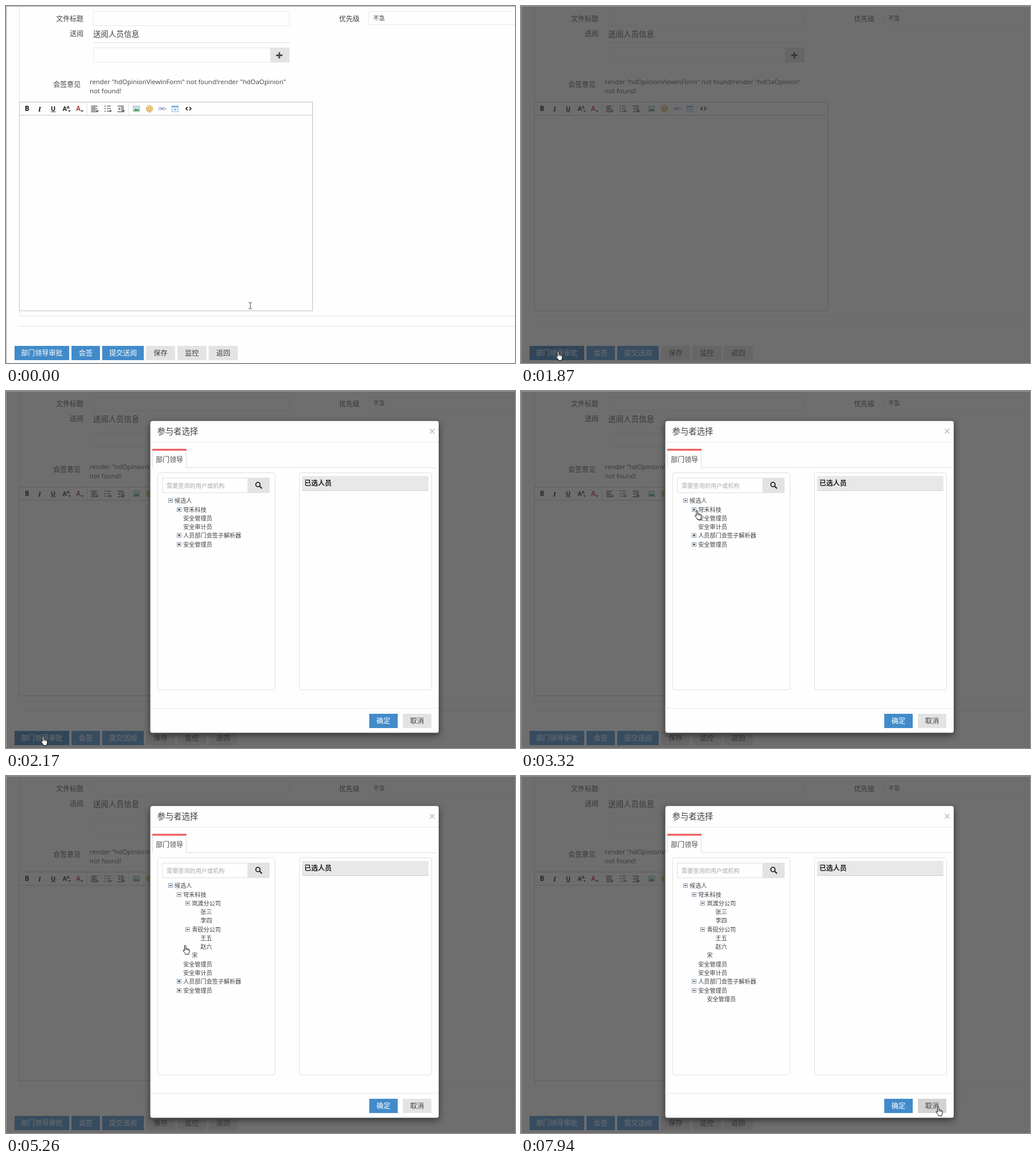
Write an HTML page that moves like this. It is 894 px wide and 626 px high and loops after 8000 ms.

```html
<!DOCTYPE html>
<html lang="zh-CN">
<head>
<meta charset="utf-8">
<title>参与者选择</title>
<style>
html, body { margin: 0; width: 100%; height: 100%; overflow: hidden; background: #fefefe; }
svg { display: block; width: 894px; height: 626px; }
text { font-family: "Noto Sans CJK SC", "Noto Sans CJK", "Open Sans", sans-serif; white-space: pre; }
.latin { font-family: "Open Sans", "Noto Sans", sans-serif; }
.tool { font-family: "Open Sans", "DejaVu Sans", sans-serif; font-weight: 700; }
.serif { font-family: "Liberation Serif", serif; font-weight: 700; font-style: italic; }
.shadow { filter: drop-shadow(0 4px 6px rgba(0,0,0,.55)); }
</style>
</head>
<body>
<svg viewBox="0 0 894 626">
  <g id="page"></g>
  <rect id="dim" width="894" height="626" fill="#333" opacity="0"/>
  <g id="frame"></g>
  <g id="modal"><g id="dialog"></g><g id="tree"></g></g>
  <g id="cursor">
    <g id="beam" fill="none" stroke="#444"><path d="M-3 -5.5H-1M1 -5.5H3M-1 -5Q0 -5 0 -4V4Q0 5 -1 5M1 -5Q0 -5 0 -4M0 4Q0 5 1 5M-3 5.5H-1M1 5.5H3"/></g>
    <path id="arrow" d="M.5 .5V16L4 12.6 6.4 18 8.6 17 6.3 11.8H11Z" fill="#fff" stroke="#111"/>
    <g id="hand" transform="translate(-4 0)" stroke="#111" stroke-linejoin="round">
      <path fill="#fff" d="M3 10V1.7Q3 .5 4.2 .5T5.4 1.7V6Q7.6 5.2 7.7 6.6 9.6 6 9.8 7.4 11.6 7 11.6 8.8V11.8Q11.4 13.4 10.4 14.6V16.5H4.6V15Q3 13.5 .9 10.4 .3 8.8 1.6 8.7 2.4 8.8 3 10Z"/>
      <path fill="none" stroke-width=".8" d="M5.4 6v3.2M7.7 6.6v2.8M9.8 7.4v2.2"/>
    </g>
  </g>
</svg>
<script>
const $ = id => document.getElementById(id);
const LOOP = 8000;
const BLUE = '#428bca', GREY = '#e3e3e3', INK = '#404040';

// y is the vertical middle of the text
const text = (x, y, s, size = 12, fill = INK, more = '') =>
  `<text x="${x}" y="${y + size * .38}" font-size="${size}" fill="${fill}" ${more}>${s}</text>`;
const rect = (x, y, w, h, fill, more = '') =>
  `<rect x="${x}" y="${y}" width="${w}" height="${h}" fill="${fill}" ${more}/>`;
const box = (x, y, w, h, stroke, more = '') =>
  rect(x + .5, y + .5, w, h, 'none', `stroke="${stroke}" ${more}`);
const line = (d, stroke, width = 1, more = '') =>
  `<path d="${d}" fill="none" stroke="${stroke}" stroke-width="${width}" ${more}/>`;
const button = (x, y, w, label, main, id = '') =>
  rect(x, y, w, 25, main ? BLUE : GREY, id && `id="${id}"`) +
  text(x + w / 2, y + 12.7, label, 12.2, main ? '#fff' : INK, 'text-anchor="middle"');
const caret = x => `<path d="M${x} 183h5l-2.5 3z" fill="#444"/>`;
const rows = (x, widths) =>
  widths.map((w, i) => line(`M${x} ${175.5 + i * 2.5}h${w}`, '#444', 1.2)).join('');

function toolbar() {
  const dots = [175.5, 180, 184.5].map(y =>
    rect(173, y - 1, 2, 2, '#5a82b4') + line(`M177 ${y}h7`, '#555', 1.2)).join('');
  return line('M142.5 169V191M215.5 169V191', '#e2e2e2') +
    text(33, 180, 'B', 11.5, '#111', 'class="tool"') +
    text(56.5, 180, 'I', 13, '#111', 'class="serif"') +
    text(78.8, 179.5, 'U', 11, '#111', 'class="tool"') + line('M79 185.5h8', '#222') +
    text(99.5, 180, 'A', 10.5, '#222', 'class="tool"') + text(106.5, 177.5, 'A', 7.5, '#222', 'class="tool"') + caret(109) +
    text(123, 180, 'A', 11.5, '#b8443c', 'class="tool"') + caret(131) +
    rows(149.5, [11, 8, 11, 8, 11]) + caret(158) + dots + caret(181) +
    rows(196, [11, 0, 0, 0, 11]) + rows(202, [0, 5, 5, 5]) +
    '<path d="M200.5 177.5v5.5l-4 -2.7z" fill="#5a82b4"/>' + caret(204) +
    rect(223.5, 175.5, 11, 9.5, '#c6e4f2', 'stroke="#9db4be"') +
    '<path d="M225 184v-1.5l3 -3 2.5 2.5 1.5 -1.5 1.5 1.5v2z" fill="#4a9a50"/>' +
    '<circle cx="252" cy="180.3" r="5.8" fill="#f4d68e" stroke="#d0a85e"/>' +
    rect(249, 178, 1.4, 2, '#94733c') + rect(253.5, 178, 1.4, 2, '#94733c') +
    line('M248.5 182q3.5 3 7 0', '#b4824a') +
    box(267.5, 177.5, 6, 4, '#8496cc', 'rx="2"') + box(274, 177.5, 6, 4, '#8496cc', 'rx="2"') +
    line('M271 180h6', '#8496cc', 1.4) +
    rect(291.5, 175.5, 11, 10, '#f0f7fb', 'stroke="#9dbfd6"') + rect(291, 175, 12, 2.5, '#5fadd6') +
    line('M294 180.5h6M294 183h6', '#b9d0df') + rect(296, 180, 2.5, 2.5, '#7fb6da') +
    line('M319 177l-3 3 3 3M322 177l3 3 -3 3', '#111', 1.5);
}

function page() {
  return rect(0, 0, 894, 626, '#fefefe') +
    line('M23.5 0V543.5H894M23 561.5H894', '#e4e4e4') +
    text(88, 22, '文件标题') + box(153, 9, 344, 25, '#e8e8e8') +
    text(585, 22, '优先级') + box(637, 9, 270, 23, '#e8e8e8') + text(645, 21.5, '不急', 10.2) +
    text(112, 48, '送阅') + text(153, 49.3, '送阅人员信息', 13.5) +
    line('M153 64.5H498', '#e4e4e4') + box(153, 73, 344, 25, '#e8e8e8') +
    rect(464, 73, 34, 26, GREY) + line('M474.5 86.5h11M480 81v11', '#4a4a4a', 2.8) +
    text(83, 137.5, '会签意见') +
    text(147, 132.8, 'render "hdOpinionViewInForm" not found!render "hdOaOpinion"', 11.39, INK, 'class="latin"') +
    text(147, 148.3, 'not found!', 11.39, INK, 'class="latin"') +
    box(23, 168, 515, 366, '#c0c0c0') + line('M24 191.5H538', '#c6c6c6') + toolbar() +
    button(15, 596, 96, '部门领导审批', true, 'approve') +
    button(115, 596, 50, '会签', true) + button(169, 596, 73, '提交送阅', true) +
    button(246, 596, 51, '保存') + button(301, 596, 51, '监控') + button(356, 596, 51, '返回');
}

function dialog() {
  return rect(253, 52, 507, 547.5, '#fefefe', 'rx="4" class="shadow"') +
    box(252.5, 51.5, 508, 548, '#555', 'rx="4"') +
    text(265.5, 70.8, '参与者选择', 14.4) + line('M744.5 66.5l8 8M752.5 66.5l-8 8', '#bbb', 1.6) +
    line('M253 89.5H760M253 556.5H760', '#e8e8e8') +
    line('M257.5 104V134M316.5 104V134.5H756', '#ddd') + rect(257, 101.5, 60, 3, '#ea5351') +
    text(263, 120, '部门领导', 12, '#4a4a4a') +
    box(266, 143, 206, 380.5, '#e0e0e0', 'rx="3"') + box(274, 152, 188, 26, '#e0e0e0') +
    text(282, 166, '需要查询的用户或机构', 10.2, '#aaa') + rect(424, 152.5, 39, 26, GREY) +
    '<circle cx="442.5" cy="164" r="3.8" fill="none" stroke="#222" stroke-width="1.8"/>' +
    line('M445.5 167l4 4', '#222', 2.2) +
    box(515, 143, 232, 380.5, '#e0e0e0', 'rx="3"') + rect(520, 149, 222, 26, '#e8e8e8') +
    line('M520 174.5H742', '#ccc') + text(524, 161.5, '已选人员', 12, '#222', 'font-weight="700"') +
    button(638, 566, 50, '确定', true) + button(697, 566, 50, '取消', false, 'cancel');
}

// [level, label, time the node opens (0: always open, null: leaf), time its parents open]
const NODES = [
  [0, '候选人', 0, 0],
  [1, '穹禾科技', 3570, 0],
  [2, '岚渡分公司', 4620, 3570],
  [3, '张三', null, 4620],
  [3, '李四', null, 4620],
  [2, '青砚分公司', 5020, 3570],
  [3, '王五', null, 5020],
  [3, '赵六', null, 5020],
  [2, '宋', null, 3570],
  [1, '安全管理员', null, 0],
  [1, '安全审计员', null, 0],
  [1, '人员部门会签子解析器', 5680, 0],
  [1, '安全管理员', 6730, 0],
  [2, '安全管理员', null, 6730]
];

function tree(t) {
  return NODES.filter(n => t >= n[3]).map(([level, label, opens], i) => {
    const x = 289 + level * 15.2, y = 192.4 + i * 15.27;
    const bx = Math.round(x) - 4, by = Math.round(y) - 4;
    const mark = opens === null ? '' :
      rect(bx + .5, by + .5, 7, 7, '#f4f7fa', 'stroke="#8fa3b8"') +
      line(`M${bx + 2} ${by + 4}h4` + (t < opens ? `M${bx + 4} ${by + 2}v4` : ''), '#111', 1.2);
    return mark + text(x + 7, y, label, 10.2);
  }).join('');
}

// [first step, last step, steps, x, y, pointer on the way, pointer on arrival]
const MOVES = [
  [280, 1180, 8, 65, 605, 'arrow', 'hand'],
  [2320, 2320, 1, 76, 592, 'arrow', 'arrow'],
  [2470, 3320, 7, 309, 209, 'arrow', 'hand'],
  [3570, 4170, 5, 317, 232, 'hand', 'hand'],
  [4330, 4480, 2, 318, 220, 'hand', 'hand'],
  [4620, 4880, 3, 318, 262, 'hand', 'hand'],
  [5160, 5560, 4, 308, 360, 'hand', 'hand'],
  [5680, 5940, 3, 300, 372, 'hand', 'hand'],
  [6070, 6310, 3, 307, 382.5, 'hand', 'hand'],
  [6460, 6580, 2, 305, 374, 'hand', 'hand'],
  [6860, 7670, 7, 744, 572, 'arrow', 'hand'],
  [7790, 7940, 2, 732.5, 579.5, 'hand', 'hand']
];

function pointer(t) {
  let x = 429, y = 525.5, kind = 'beam';
  for (const [from, to, n, tx, ty, going, arrived] of MOVES) {
    if (t < from) break;
    const gap = n > 1 ? (to - from) / (n - 1) : 1;
    const step = Math.min(n, Math.floor((t - from) / gap + 1.001));
    const p = 1 - (1 - step / n) ** 1.5;
    x += (tx - x) * p;
    y += (ty - y) * p;
    kind = step === n ? arrived : going;
  }
  return { x, y, kind };
}

$('page').innerHTML = page();
$('frame').innerHTML = line('M0 .5H894M.5 0V626', '#999');
$('dialog').innerHTML = dialog();

let shownTree = '';
function draw(t) {
  const c = pointer(t);
  $('cursor').setAttribute('transform', `translate(${c.x} ${c.y})`);
  for (const k of ['beam', 'arrow', 'hand']) $(k).style.display = k === c.kind ? '' : 'none';

  $('dim').setAttribute('opacity', t < 1720 ? 0 : t < 1870 ? .083 : .7);
  $('modal').style.display = t < 2030 ? 'none' : '';
  $('modal').setAttribute('opacity', t < 2170 ? .6 : 1);
  $('modal').setAttribute('transform', `translate(0 ${t < 2170 ? -28 : 0})`);

  const hover = t < 2320 && c.kind === 'hand';
  $('approve').setAttribute('fill', hover ? '#3071b4' : BLUE);
  $('cancel').setAttribute('fill', t >= 7670 ? '#d2d2d2' : GREY);

  const next = tree(t);
  if (next !== shownTree) $('tree').innerHTML = shownTree = next;
}

const start = performance.now();
function tick() {
  draw((performance.now() - start) % LOOP);
  requestAnimationFrame(tick);
}
tick();
</script>
</body>
</html>
```
